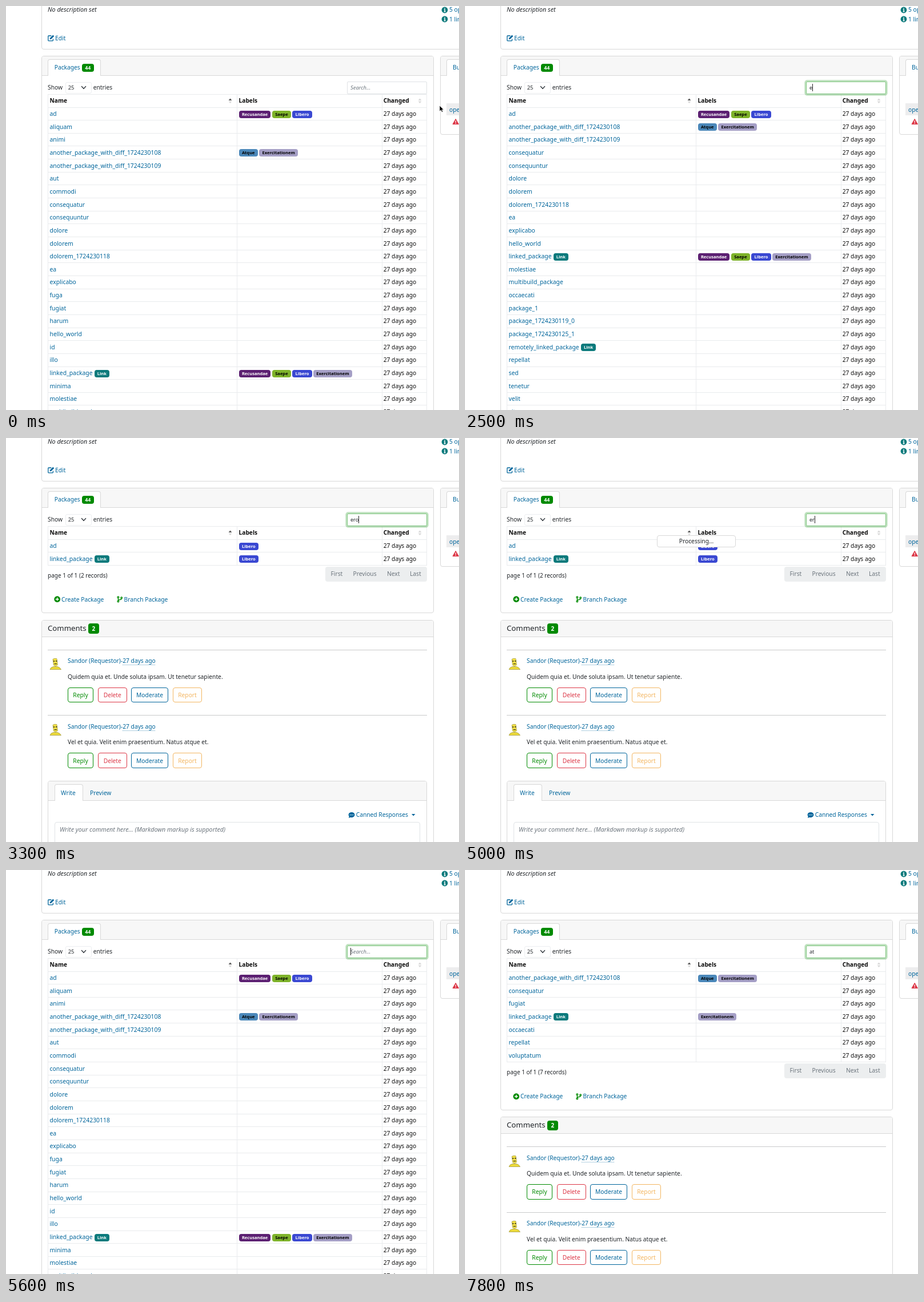
These frames come from a looping animation (793 by 706 pixels, 8000 ms). An HTML page:

```html
<!DOCTYPE html>
<html lang="en">
<head>
<meta charset="utf-8">
<title>Package list search</title>
<style>
  html, body { margin: 0; width: 100%; height: 100%; overflow: hidden; background: #fff; }
  #stage { position: relative; width: 793px; height: 706px; overflow: hidden;
    font: 10.25px/20px "Noto Sans", "Open Sans", sans-serif; color: #212529; }
  #stage div, #stage svg { position: absolute; box-sizing: border-box; }
  .t { white-space: pre; height: 20px; }
  .a { color: #00659b; }
  .k { color: #0c0c0c; }
  .b { color: #0c0c0c; font-weight: 700; font-size: 10.2px; }
  .i { font-style: italic; font-size: 10.72px; }
  .g { color: #6c757d; }
  .h { font-size: 13.2px; }
  .card { border: 1px solid #d8d8d8; border-radius: 4px; background: #fff; }
  .head { background: #f7f7f7; border-bottom: 1px solid #d8d8d8; border-radius: 3px 3px 0 0; }
  .tab { border: 1px solid #d8d8d8; border-bottom: 0; border-radius: 4px 4px 0 0; background: #fff; }
  .line { background: #e9ebed; }
  .btn { border: 1px solid; border-radius: 4px; display: flex; align-items: center; justify-content: center; }
  .count { background: #008a00; color: #fff; font-weight: 700; border-radius: 4px;
    display: flex; align-items: center; justify-content: center; }
  .cell { display: flex; align-items: center; white-space: pre; height: 22px; font-size: 10.4px; }
  .badge { font: 700 7.55px/13px "Noto Sans", "Open Sans", sans-serif; height: 13px; padding: 0 5.2px;
    border-radius: 4px; margin: 2px 2.6px 0 0; }
  .ago { text-decoration: underline dotted 1px rgba(0, 101, 155, .6); text-underline-offset: 2.5px; }
  #field { left: 597px; top: 132px; width: 140px; height: 22px; border: 1px solid #dfe2e5;
    border-radius: 2px; background: #fff; }
  #query, #hint { left: 603px; top: 132.5px; font-size: 9.05px; color: #212529; }
  #hint { font-size: 9.4px; font-style: italic; color: #6c757d; }
  #caret { position: absolute; top: 3.5px; width: 1px; height: 13px; background: #222; }
  #busy { left: 336px; width: 138px; height: 21px; line-height: 19px; text-align: center;
    border: 1px solid #d8d8d8; border-radius: 4px; background: #fff; }
</style>
</head>
<body>
<div id="stage"></div>
<script>
const LOOP = 8000, TOP = 177, ROW = 22.65, PAGE = 25;
const LINK = '#00659b', GREEN = '#008a00', TEAL = '#0b7a7c';

const LABELS = {
  Recusandae: ['#5c2072', '#fff'],
  Saepe: ['#7eb32a', '#000'],
  Libero: ['#3a48d2', '#fff'],
  Atque: ['#4b88ba', '#000'],
  Exercitationem: ['#a59fc6', '#000'],
};
const TAGS = {
  ad: ['Recusandae', 'Saepe', 'Libero'],
  another_package_with_diff_1724230108: ['Atque', 'Exercitationem'],
  linked_package: ['Recusandae', 'Saepe', 'Libero', 'Exercitationem'],
};
const NAMES = `ad aliquam animi another_package_with_diff_1724230108 another_package_with_diff_1724230109
  aut commodi consequatur consequuntur dolore dolorem dolorem_1724230118 ea explicabo fuga fugiat harum
  hello_world id illo linked_package minima molestiae multibuild_package occaecati package_1
  package_1724230119_0 package_1724230125_1 quia remotely_linked_package repellat sed tenetur velit
  vitae voluptatum`.split(/\s+/);

// Each step changes part of the state at its time.
const STEPS = [
  [0, { text: '', filter: '', busy: 0, caret: 0, focus: 0, pointer: ['arrow', 759, 174] }],
  [100, { pointer: ['arrow', 703, 145] }],
  [300, { pointer: ['beam', 697, 145] }],
  [400, { pointer: ['beam', 694, 143] }],
  [600, { focus: 0.5, caret: 1 }],
  [700, { focus: 1 }],
  [1800, { caret: 0 }],
  [2300, { text: 'e', busy: 1, caret: 1, pointer: null }],
  [2500, { filter: 'e', busy: 0 }],
  [2900, { text: 'er', filter: 'er' }],
  [3200, { text: 'ero', busy: 1 }],
  [3300, { filter: 'ero', busy: 0 }],
  [4200, { caret: 0 }],
  [5000, { text: 'er', busy: 1, caret: 1 }],
  [5100, { filter: 'er', busy: 0 }],
  [5300, { text: 'e', busy: 1 }],
  [5400, { text: '' }],
  [5600, { filter: '', busy: 0 }],
  [6600, { caret: 0 }],
  [7000, { text: 'a', busy: 1, caret: 1 }],
  [7100, { filter: 'a', busy: 0 }],
  [7300, { text: 'at' }],
  [7400, { busy: 1 }],
  [7500, { filter: 'at', busy: 0 }],
  [7800, { caret: 0 }],
];

const px = (x, y) => `left:${x}px;top:${y}px;`;
const box = (x, y, w, h, cls, css = '', inner = '') =>
  `<div class="${cls}" style="${px(x, y)}width:${w}px;height:${h}px;${css}">${inner}</div>`;
// y is the vertical middle of the text
const txt = (x, y, s, cls = '', css = '') =>
  `<div class="t ${cls}" style="${px(x, y - 10.3)}${css}">${s}</div>`;
const svg = (x, y, w, h, inner) =>
  `<svg style="${px(x, y)}" width="${w}" height="${h}">${inner}</svg>`;
const line = (x, y, w, h) => box(x, y, w, h, 'line');
const badge = (s, bg, fg) => `<span class="badge" style="background:${bg};color:${fg}">${s}</span>`;

const info = y => svg(762, y - 6, 12, 12,
  `<circle cx="6" cy="6" r="5.4" fill="${TEAL}"/><path d="M6 2.6v1.6M4.8 5.4H6.2V8.6M4.6 8.8h2.9" stroke="#fff" stroke-width="1.4" fill="none"/>`);
const sorter = (x, up) => svg(x, 161, 7, 10,
  `<path d="M.6 4L3.5 .4L6.4 4Z" fill="${up}"/><path d="M.6 5.6L3.5 9.2L6.4 5.6Z" fill="#d9d9d9"/>`);

const shell = () => [
  box(62, -20, 900, 95.5, 'card'),
  txt(73, 6.5, 'No description set', 'i'),
  svg(73, 50, 12, 12, `<path d="M6.5 2H1.6Q.8 2 .8 2.8V10Q.8 10.8 1.6 10.8H8.6Q9.4 10.8 9.4 10V7.5" fill="none" stroke="${LINK}" stroke-width="1.3"/>
    <path d="M3.6 8.3L4 6L9.2 .7L11.3 2.8L6 8Z" fill="${LINK}"/>`),
  txt(86, 56, 'Edit', 'a'),
  info(6.5), txt(776, 6.5, '5 open requests', 'a'),
  info(23), txt(776, 23, '1 linked package', 'a'),

  box(759.5, 86.5, 120, 138, 'card'),
  box(760.5, 87.5, 120, 34.5, 'head'),
  box(771, 93, 90, 29, 'tab'),
  txt(782, 107.5, 'Build Results', 'a'),
  box(771, 170, 60, 21, '', 'background:#ededee;'),
  txt(776, 181, 'operating_base', 'a'),
  svg(781, 196, 13, 12, '<path d="M6.2 1.4L11.4 10.6H1Z" fill="#dc3545" stroke="#dc3545" stroke-linejoin="round"/><path d="M6.2 4.2V7.4M6.2 8.3V9.7" stroke="#fff" stroke-width="1.3"/>'),

  '<div id="panel" class="card" style="left:62px;top:86.5px;width:686.5px"></div>',
  box(63, 87.5, 684.5, 34.5, 'head'),
  box(73, 93, 92.5, 29, 'tab'),
  txt(84.7, 107.5, 'Packages', 'a'),
  box(132.5, 100.5, 21.5, 14.5, 'count', 'font-size:8.8px;', '44'),
  txt(73, 142.5, 'Show'),
  box(103.5, 133, 46.5, 20, '', 'border:1px solid #eceef0;border-radius:3px;'),
  txt(108.7, 143, '25', '', 'font-size:9.4px;'),
  svg(131, 139, 10, 8, '<path d="M1.4 1.6L5 5.4L8.6 1.6" fill="none" stroke="#343a40" stroke-width="1.4" stroke-linecap="round"/>'),
  txt(152.7, 142.5, 'entries'),

  '<div id="table" style="left:0;top:0"></div><div id="lower" style="left:0"></div>',
  '<div id="field"></div><div id="hint" class="t">Search...</div>',
  '<div id="query" class="t"><span id="typed"></span><span id="caret"></span></div>',
  '<div id="busy">Processing...</div><div id="pointer" style="left:0;top:0"></div>',
].join('');

const person = 'Sandor';
const avatar = y => svg(76, y, 22, 22,
  `<path d="M1 20.5Q2 16.5 7 15.5H14Q18.5 16.5 20.5 20.5Z" fill="#ecda3a" stroke="#8a8128" stroke-width=".6"/>
   <path d="M6 2.5Q9.5 .3 13 1.8L14.4 12.5Q10.5 16 7.4 13Z" fill="#f2e044" stroke="#8a8128" stroke-width=".6"/>
   <path d="M6.8 6h2.5M11 5.8h2.5M8.6 10.6h4.2" stroke="#35331d" stroke-width="1.4"/>`);

function comment(y, body) {
  const btn = (x, w, s, color) => box(x, y + 66, w, 26.5, 'btn', `color:${color};`, s);
  return box(73, y, 664, 1, '', 'background:#c9cacb;') + avatar(y + 14.5) +
    txt(108, y + 20, `${person} (Requestor)-<span class="ago">27 days ago</span>`, 'a') +
    txt(108, y + 47.5, body) +
    btn(108, 45, 'Reply', GREEN) + btn(161, 50.5, 'Delete', '#dc3545') +
    btn(219, 65, 'Moderate', LINK) + btn(292, 51, 'Report', '#f3b661');
}

// Everything below the table, measured from the table's bottom edge.
const lower = () => [
  box(559, 2.3, 178, 26, '', 'background:#eceeef;border-radius:4px;'),
  ...[['First', 568.5], ['Previous', 607.5], ['Next', 667], ['Last', 707]].map(([s, x]) => txt(x, 15, s, 'g')),
  svg(84, 54, 12, 12, `<circle cx="5.7" cy="5.7" r="5.4" fill="${GREEN}"/><path d="M5.7 2.8V8.6M2.8 5.7H8.6" stroke="#fff" stroke-width="1.5"/>`),
  txt(97, 59.7, 'Create Package', 'a'),
  svg(194, 54, 11, 12, `<g fill="none" stroke="${GREEN}" stroke-width="1.4"><circle cx="2.4" cy="2.2" r="1.3"/><circle cx="2.4" cy="9.6" r="1.3"/><circle cx="8.2" cy="3.2" r="1.3"/><path d="M2.4 3.5V8.3M8.2 4.5Q8.2 6.4 5.5 6.5Q2.4 6.6 2.4 8.2"/></g>`),
  txt(206.5, 59.7, 'Branch Package', 'a'),

  box(62, 95.5, 686.5, 700, 'card'),
  box(63, 96.5, 684.5, 29, 'head'),
  txt(73, 110, 'Comments', 'h'),
  box(144, 102, 18.5, 17.5, 'count', 'font-size:10px;', '2'),
  comment(147.5, 'Quidem quia et. Unde soluta ipsam. Ut tenetur sapiente.'),
  comment(262, 'Vel et quia. Velit enim praesentium. Natus atque et.'),

  box(73, 377, 664, 300, 'card'),
  box(74, 378, 662, 33.5, 'head'),
  box(84.5, 383, 50.5, 28.5, 'tab'),
  txt(96, 397.7, 'Write', 'a'),
  txt(147, 397.7, 'Preview', 'a'),
  svg(599, 430.5, 12, 12, `<ellipse cx="6" cy="5.6" rx="5.4" ry="4.6" fill="${LINK}"/><path d="M1 11L2 7L5 9.6Z" fill="${LINK}"/><path d="M2.8 5.6h1.4M5.3 5.6h1.4M7.8 5.6h1.4" stroke="#fff" stroke-width="1.3"/>`),
  txt(612.7, 436, 'Canned Responses', 'a'),
  svg(710, 434.5, 7, 4, `<path d="M0 0H6.4L3.2 3.4Z" fill="${LINK}"/>`),
  box(84.5, 448.5, 640.5, 100, 'card', 'border-color:#e0e3e6;'),
  txt(94, 462.5, 'Write your comment here... (Markdown markup is supported)', 'i g'),
].join('');

const has = (s, q) => s.toLowerCase().includes(q);

function search(q) {
  return NAMES.map(name => {
    const tags = TAGS[name] || [];
    return { name, hit: has(name, q), tags: has(name, q) ? tags : tags.filter(s => has(s, q)) };
  }).filter(r => r.hit || r.tags.length).slice(0, PAGE);
}

function tableHtml(rows) {
  const bottom = TOP + ROW * rows.length;
  const out = [
    txt(76.5, 165.7, 'Name', 'b'), txt(407.5, 165.7, 'Labels', 'b'), txt(660.7, 165.7, 'Changed', 'b'),
    sorter(389, '#555'), sorter(721, '#d9d9d9'), line(73, 154, 664, 1), line(73, 176.5, 664, 1),
    ...[73, 404, 657.5, 736].map(x => line(x, 154, 1, bottom - 154)),
  ];
  rows.forEach(({ name, tags }, i) => {
    const y = TOP + ROW * i;
    const link = /linked_/.test(name) ? '<span style="width:3px"></span>' + badge('Link', TEAL, '#fff') : '';
    out.push(
      `<div class="cell a" style="${px(76.5, y)}">${name}${link}</div>`,
      `<div class="cell" style="${px(407.7, y)}">${tags.map(s => badge(s, ...LABELS[s])).join('')}</div>`,
      txt(660.7, y + 11.3, '27 days ago', 'k'),
      line(73, y + ROW - 0.5, 664, 1));
  });
  return out.join('');
}

const POINTERS = {
  arrow: (x, y) => svg(x - 1, y - 1, 11, 15,
    '<path d="M1 1V11L3.4 8.9L5 12.4L6.8 11.6L5.2 8.2H8.2Z" fill="#000" stroke="#fff" stroke-width=".7"/>'),
  beam: (x, y) => svg(x - 4, y - 7, 8, 14,
    '<path d="M1.5 1.5H3L4 2.4L5 1.5H6.5M4 2.4V11.6M1.5 12.5H3L4 11.6L5 12.5H6.5" fill="none" stroke="#111" stroke-width="1.2"/>'),
};

const $ = id => document.getElementById(id);
$('stage').innerHTML = shell();

function draw(s) {
  const rows = search(s.filter), n = rows.length, bottom = TOP + ROW * n;
  $('table').innerHTML = tableHtml(rows);
  $('panel').style.height = bottom + 84 - 86.5 + 'px';
  $('lower').style.top = bottom + 'px';
  $('lower').innerHTML = txt(73, 17.7, `page 1 of 1 (${n} records)`, '', 'font-size:10px;') + lower();
  $('typed').textContent = s.text;
  $('hint').style.display = s.text ? 'none' : '';
  $('caret').style.display = s.caret ? '' : 'none';
  $('busy').style.display = s.busy ? '' : 'none';
  $('busy').style.top = 193 + (n - 4) * ROW / 2 + 'px';
  const f = s.focus;
  $('field').style.borderColor = f ? `rgb(${223 - 95 * f},${226 - 29 * f},${229 - 101 * f})` : '';
  $('field').style.boxShadow = f ? `0 0 0 2.68px rgba(0,138,0,${0.25 * f})` : '';
  $('pointer').innerHTML = s.pointer ? POINTERS[s.pointer[0]](...s.pointer.slice(1)) : '';
}

let shown = -1;
const start = performance.now();
function tick() {
  const t = (performance.now() - start) % LOOP;
  const count = STEPS.filter(([at]) => at <= t).length;
  if (count !== shown) {
    shown = count;
    draw(Object.assign({}, ...STEPS.slice(0, count).map(([, change]) => change)));
  }
  requestAnimationFrame(tick);
}
tick();
</script>
</body>
</html>
```
